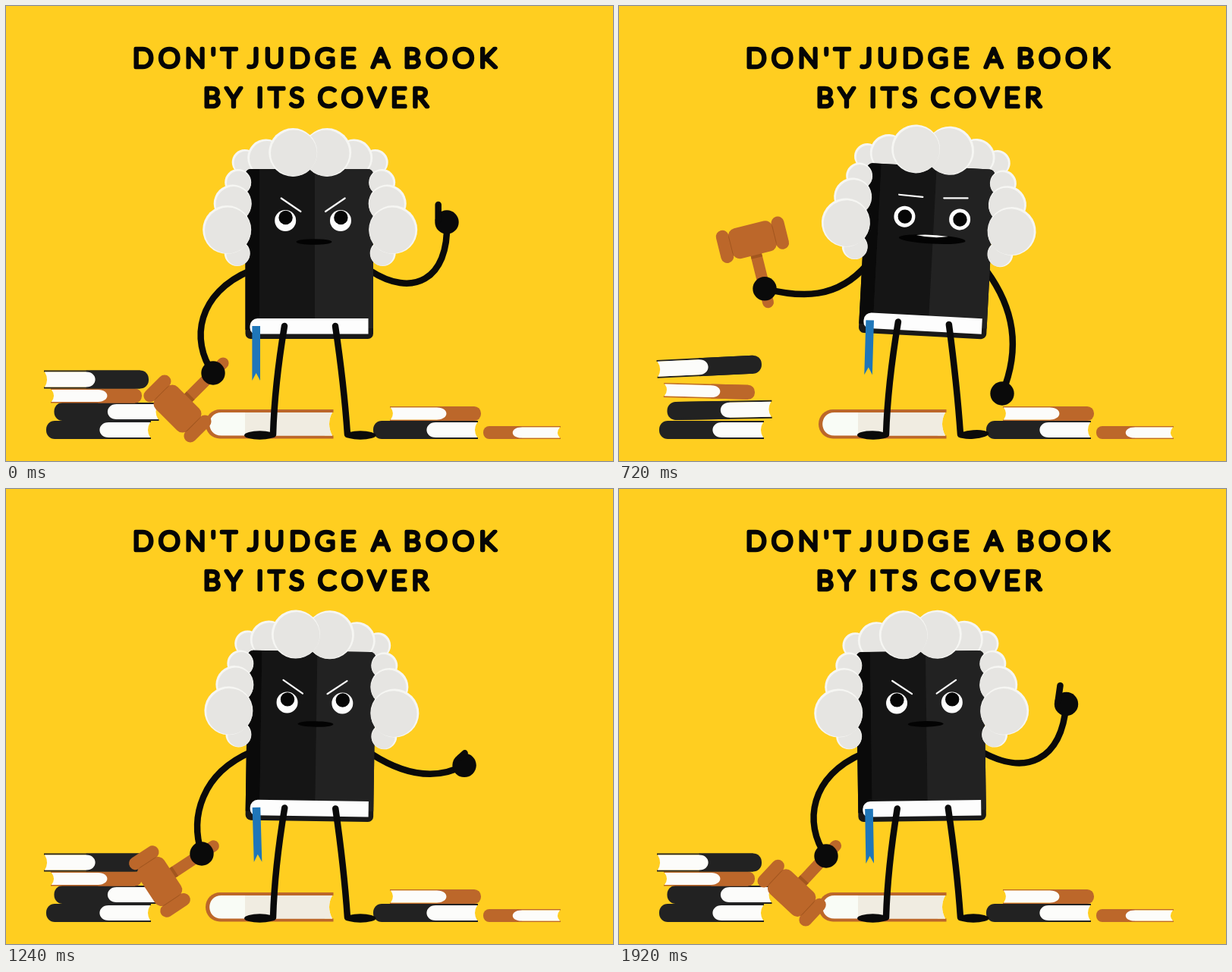
Write an HTML page with a canvas that moves like this. It is 800 px wide and 600 px high and loops after 1960 ms.

```html
<!DOCTYPE html>
<html lang="en">
<head>
<meta charset="utf-8">
<title>Don't judge a book by its cover</title>
<style>
html, body { margin: 0; width: 100%; height: 100%; overflow: hidden; background: #ffce20; }
canvas, svg { position: absolute; left: 0; top: 0; width: 800px; height: 600px; }
text { font: 300 36px Lato, sans-serif; letter-spacing: 6.6px; fill: #050505; stroke: #050505;
  stroke-width: 4.6px; stroke-linejoin: round; stroke-linecap: round; font-kerning: none; }
</style>
</head>
<body>
<canvas id="stage" width="800" height="600"></canvas>
<svg viewBox="0 0 800 600">
  <text y="81"><tspan x="167">DON'T</tspan> <tspan x="319">JUDGE</tspan> <tspan x="482">A</tspan> <tspan x="524">BOOK</tspan></text>
  <text y="133"><tspan x="260">BY</tspan> <tspan x="330">ITS</tspan> <tspan x="411">COVER</tspan></text>
</svg>
<script>
const ctx = document.getElementById('stage').getContext('2d');
const LOOP = 1960, STEP = 40, RAD = Math.PI / 180;
const BG = '#ffce20', INK = '#0a0a0a', DARK = '#222222', WOOD = '#bc672a', WOOD_DARK = '#a2561f', PAGE = '#fcfcfa';

// Timing helpers
const clamp = u => Math.min(1, Math.max(0, u));
const ramp = (t, a, b) => { const u = clamp((t - a) / (b - a)); return u * u * (3 - 2 * u); };
const bump = (t, mid, w) => Math.cos(clamp(Math.abs(t - mid) / w) * Math.PI / 2) ** 2;
const mix = (a, b, u) => a + (b - a) * u;
const mixAll = (a, b, u) => a.map((v, i) => mix(v, b[i], u));
const shift = (a, d, k) => a.map((v, i) => v + d[i] * k);

// Drawing helpers
function group(x, y, deg, draw) {
  ctx.save();
  ctx.translate(x, y);
  ctx.rotate(deg * RAD);
  draw();
  ctx.restore();
}
function fill(color, build) {
  ctx.fillStyle = color;
  ctx.beginPath();
  build();
  ctx.fill();
}
function stroke(color, width, build) {
  ctx.strokeStyle = color;
  ctx.lineWidth = width;
  ctx.lineCap = 'round';
  ctx.beginPath();
  build();
  ctx.stroke();
}
function clipped(build, draw) {
  ctx.save();
  ctx.beginPath();
  build();
  ctx.clip();
  draw();
  ctx.restore();
}
const oval = (c, x, y, rx, ry = rx, deg = 0) => fill(c, () => ctx.ellipse(x, y, rx, ry, deg * RAD, 0, 7));
const box = (c, x, y, w, h, r = 0) => fill(c, () => ctx.roundRect(x, y, w, h, r));
const line = (c, w, x1, y1, x2, y2) => stroke(c, w, () => { ctx.moveTo(x1, y1); ctx.lineTo(x2, y2); });

// Lying book around its centre; side 1 puts the spine on the left.
function book(color, w, h, cx, cy, side, deg = 0) {
  group(cx, cy, deg, () => {
    ctx.scale(side, 1);
    ctx.translate(-w / 2, -h / 2);
    const r = h * 0.47, edge = h / 12, spine = w * (color === DARK ? 0.51 : 0.38), joint = spine + 12;
    box(color, 0, 0, joint, h, [r, 0, 0, r]);
    box(color, r, 0, w - r, edge);
    box(color, r, h - edge, w - r, edge);
    fill(PAGE, () => {
      ctx.moveTo(joint, edge);
      ctx.lineTo(w - 1, edge);
      ctx.quadraticCurveTo(w - 7, h / 2, w - 1, h - edge);
      ctx.lineTo(joint, h - edge);
      ctx.bezierCurveTo(spine - 4, h - edge, spine - 4, edge, joint, edge);
    });
  });
}
const thick = (...p) => book(DARK, 138, 24, ...p);
const thin = (...p) => book(WOOD, 120, 19, ...p);

function bigBook() {
  box(WOOD, 263, 532, 168.5, 38.5, [19, 0, 0, 19]);
  box(BG, 420, 536, 12, 30.5);
  const pages = () => {
    ctx.moveTo(284, 536);
    ctx.lineTo(430, 536);
    ctx.quadraticCurveTo(422, 551, 430, 566.5);
    ctx.lineTo(284, 566.5);
    ctx.bezierCurveTo(263, 566.5, 263, 536, 284, 536);
  };
  fill('#f9fcf6', pages);
  clipped(() => ctx.rect(315, 530, 120, 45), () => fill('#f0ece1', pages));
}

function books(lift) {
  thick(122, 559, 1);
  thick(132.5, 535 - 2 * lift, 1, -lift);
  thin(119, 514 - 6 * lift, -1, 1.5 * lift);
  thick(119, 492.5 - 17 * lift, -1, -2.8 * lift);
  bigBook();
  thin(566, 537.5, -1);
  thick(553, 559, 1);
  book(WOOD, 102, 17, 680, 562.5, 1);
}

// Wig curls, mirrored: distance from the middle, height, radius
const BACK_CURLS = [[86, 206, 17], [58, 200, 24.5]];
const FRONT_CURLS = [[96, 326, 17], [95, 232.5, 17.5], [102, 260.5, 25], [109.5, 295, 32], [22.5, 193, 32]];
function curls(list, squash) {
  for (const [dx, cy, r] of list) for (const s of [1, -1]) {
    const x = 400.7 + s * dx, y = 240 + (cy - 240) * (1 - squash);
    oval('#f6f6f3', x, y, r);
    oval('#e6e5e2', x - s * 1.2, y + 1, r - 1.6);
  }
}

function face(m) {
  const brow = mixAll([42, 253.5, 16.3, 271], [45.3, 254.5, 14, 256], m);
  for (const s of [-1, 1]) {
    const x = 404.6 + 36.4 * s;
    oval('#fdfdfd', x, 283, 14);
    oval('#060606', x + 0.4, mix(279, 283, m), 9.2);
    line('#fafafa', 2.2, 404.7 + s * brow[0], brow[1], 404.7 + s * brow[2], brow[3]);
  }
  oval('#030303', 406, 311, mix(23.5, 44, m), mix(3.8, 6, m));
  if (m > 0.4) fill('#f4f4f2', () => {
    const w = 21 * m;
    ctx.moveTo(406 - w, 306.4);
    ctx.quadraticCurveTo(406, 304, 406 + w, 306.4);
    ctx.quadraticCurveTo(406, 310.5, 406 - w, 306.4);
  });
}

function cover() {
  box('#191919', 315.5, 215, 168.5, 224, 7);
  box('#0a0a0a', 315.5, 215, 18.5, 212, [7, 0, 0, 0]);
  box('#151515', 334, 215, 73, 198);
  box(DARK, 407, 215, 77, 210, [0, 7, 0, 0]);
  box('#fdfdfd', 321.5, 412, 156, 20.5, [10, 0, 0, 8]);
}

function ribbon(x, y, deg) {
  group(x, y, deg, () => fill('#1f76b9', () => {
    ctx.moveTo(-5.3, 0);
    ctx.lineTo(5.3, 0);
    ctx.lineTo(5.3, 72);
    ctx.lineTo(0, 62);
    ctx.lineTo(-5.3, 72);
  }));
}

function gavel(x, y, deg) {
  group(x, y, deg, () => {
    const barrel = () => ctx.roundRect(-30, -87, 60, 41, 10);
    box(WOOD, -7.5, -50, 15, 76, 7.5);
    box(WOOD_DARK, -7.5, -48, 15, 6);
    fill(WOOD, barrel);
    for (const s of [-1, 1]) {
      const cap = () => ctx.roundRect(s * 37.5 - 8.5, -88.5, 17, 44, 8.5);
      fill(WOOD, cap);
      clipped(barrel, () => fill(WOOD_DARK, cap));
    }
  });
}

// p: two control points, then the hand
function arm(shoulder, p) {
  stroke(INK, 8.5, () => {
    ctx.moveTo(...shoulder);
    ctx.bezierCurveTo(...p);
  });
  oval(INK, p[4], p[5], 15.7);
}

const LEFT_LOW = [253, 378, 242, 440, 273, 484], LEFT_HIGH = [287, 390, 240, 393, 192, 363];
const RIGHT_HIGH = [535, 385, 584, 362, 581, 285], RIGHT_LOW = [520, 398, 530, 450, 505, 511];
const arc = u => 4 * u * (1 - u);

function leftArm(t, sway, shoulder) {
  const up = ramp(t, 0, 420) - ramp(t, 1010, 1120);
  const windup = bump(t, 1005, 100), rebound = bump(t, 1240, 110);
  const wave = -6 - 8 * bump(t, 720, 200) + 15 * ramp(t, 720, 960);
  let p = mixAll(LEFT_LOW, LEFT_HIGH, up);
  p = shift(p, [0, 0, -20, 0, -40, 0], arc(up));
  p = shift(p, [0, 0.2, 0, 0.6, 0, -0.7], wave * up);
  p = shift(p, [-8, -5, -25, -60, 10, -125], windup);
  p = shift(p, [5, -3, 0, -8, -15, -3], rebound);
  gavel(p[4], p[5], mix(-135, wave, up) + 12 * rebound - 2 * sway);
  arm(shoulder, p);
}

function rightArm(t, sway, shoulder) {
  const down = ramp(t, 0, 420) - ramp(t, 1060, 1360);
  let p = mixAll(RIGHT_HIGH, RIGHT_LOW, down);
  p = shift(p, [-8, -14, 0, -8, 53, 0], arc(down));
  p = shift(p, [0, -7, -1, -2, 8.5, -1.5], sway);
  arm(shoulder, p);
  const len = 19 * (1 - 1.75 * down);
  if (len > 0) group(p[4], p[5], 130 * down + 8 * sway, () => line(INK, 8.5, -11.3, -3, -11.3, -4 - len));
}

function legs(place) {
  const leg = (top, bend, foot) => stroke(INK, 8.5, () => {
    ctx.moveTo(...place(top, 422));
    ctx.quadraticCurveTo(bend, 500, foot, 565);
  });
  leg(367, 354, 352);
  leg(434, 445.5, 450);
}

function draw(t) {
  const sway = Math.sin((t - 1740) / 720 * 2 * Math.PI) * ramp(t, 1120, 1560);
  const tilt = 3 * (ramp(t, 0, 400) - ramp(t, 720, 1060)) + bump(t, 1240, 200) - 0.8 * sway;
  const base = 439 - 1.3 * Math.abs(tilt);
  const mood = ramp(t, 120, 320) - ramp(t, 960, 1140);
  const squash = 0.09 * bump(t, 920, 220);
  const c = Math.cos(tilt * RAD), s = Math.sin(tilt * RAD);
  const place = (x, y) => [400 + (x - 400) * c - (y - 439) * s, base + (x - 400) * s + (y - 439) * c];

  ctx.fillStyle = BG;
  ctx.fillRect(0, 0, 800, 600);
  books(ramp(t, 500, 700) - ramp(t, 1000, 1090));
  rightArm(t, sway, place(480, 349));
  leftArm(t, sway, place(322, 349));
  group(400, base, tilt, () => {
    ctx.translate(-400, -439);
    curls(BACK_CURLS, squash);
    cover();
    face(mood);
    curls(FRONT_CURLS, squash);
  });
  ribbon(...place(329.7, 422), 6 * bump(t, 900, 280) - 1.5 * bump(t, 1240, 120) - sway);
  legs(place);
  oval(INK, 334.5, 566, 20.5, 5.8, mood);
  oval(INK, 467, 566 - mood, 20.5, 5.8, -4 * mood);
}

const start = performance.now();
function tick() {
  const t = (performance.now() - start) % LOOP;
  draw(Math.floor(t / STEP) * STEP);
  requestAnimationFrame(tick);
}
draw(0);
requestAnimationFrame(tick);
</script>
</body>
</html>
```
